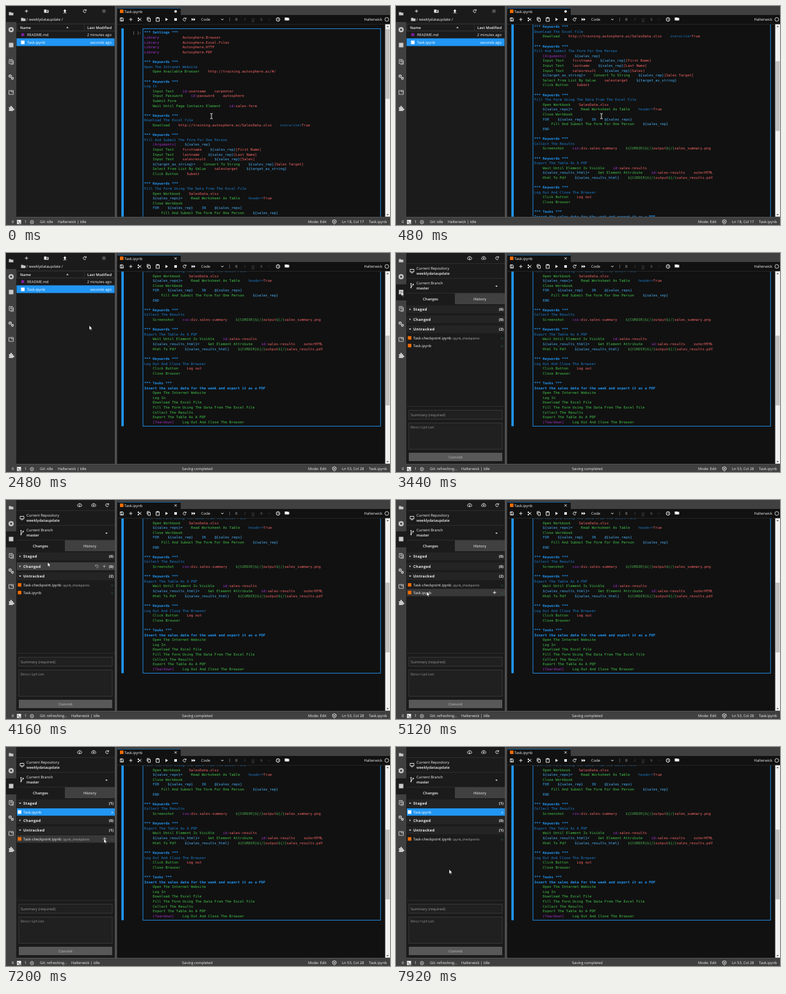
Animation of 600x342 px, one loop 8 s. Source, as an HTML page:

```html
<!DOCTYPE html>
<html lang="en">
<head>
<meta charset="utf-8">
<title>Notebook</title>
<style>
html, body { margin: 0; width: 100%; height: 100%; overflow: hidden; background: #111; }
svg { display: block; }
text { font: 500 5.8px "Open Sans", "Noto Sans", sans-serif; white-space: pre; text-rendering: geometricPrecision; }
.code { font: 5.53px "DejaVu Sans Mono", monospace; }
.semi { font-weight: 600; }
.bold { font-weight: 700; }
</style>
</head>
<body>
<svg id="stage" width="600" height="342" viewBox="0 0 600 342"></svg>
<script>
const BLUE = '#2196f3', SOFT = '#f2f2f2', DIM = '#666', ORANGE = '#ef6c00';
const BAR = '#404040', PANEL = '#1b1b1b', GAP = '#505050', RULE = '#3a3a3a';
const LOOP = 8000, STEP = 80;
const CLICK = 1200, SAVED = 1920, GIT = 3440, SELECT = 5200, STAGE = 7200;

const source = `*** Settings ***
Library           Autosphere.Browser
Library           Autosphere.Excel.Files
Library           Autosphere.HTTP
Library           Autosphere.PDF

*** Keywords ***
Open The Intranet Website
    Open Available Browser    http://training.autosphere.ai/#/

*** Keywords ***
Log In
    Input Text    id:username    carpenter
    Input Password    id:password    autosphere
    Submit Form
    Wait Until Page Contains Element    id:sales-form

*** Keywords ***
Download The Excel file
    Download    http://training.autosphere.ai/SalesData.xlsx    overwrite=True

*** Keywords ***
Fill And Submit The Form For One Person
    [Arguments]    \${sales_rep}
    Input Text    firstname    \${sales_rep}[First Name]
    Input Text    lastname    \${sales_rep}[Last Name]
    Input Text    salesresult    \${sales_rep}[Sales]
    \${target_as_string}=    Convert To String    \${sales_rep}[Sales Target]
    Select From List By Value    salestarget    \${target_as_string}
    Click Button    Submit

*** Keywords ***
Fill The Form Using The Data From The Excel File
    Open Workbook    SalesData.xlsx
    \${sales_reps}=    Read Worksheet As Table    header=True
    Close Workbook
    FOR    \${sales_rep}    IN    @{sales_reps}
        Fill And Submit The Form For One Person    \${sales_rep}
    END

*** Keywords ***
Collect The Results
    Screenshot    css:div.sales-summary    \${CURDIR}\${/}output\${/}sales_summary.png

*** Keywords ***
Export The Table As A PDF
    Wait Until Element Is Visible    id:sales-results
    \${sales_results_html}=    Get Element Attribute    id:sales-results    outerHTML
    Html To Pdf    \${sales_results_html}    \${CURDIR}\${/}output\${/}sales_results.pdf

*** Keywords ***
Log Out And Close The Browser
    Click Button    Log out
    Close Browser

*** Tasks ***
Insert the sales data for the week and export it as a PDF
    Open The Internet Website
    Log In
    Download The Excel File
    Fill The Form Using The Data From The Excel File
    Collect The Results
    Export The Table As A PDF
    [Teardown]    Log Out And Close The Browser`;

// Drawing helpers; text is placed by its vertical centre
const rect = (x, y, w, h, fill, extra = '') => `<rect x="${x}" y="${y}" width="${w}" height="${h}" fill="${fill}" ${extra}/>`;
const frame = (x, y, w, h, color, fill = 'none') => rect(x, y, w, h, fill, `stroke="${color}" stroke-width=".9"`);
const dot = (x, y, r, fill, extra = '') => `<circle cx="${x}" cy="${y}" r="${r}" fill="${fill}" ${extra}/>`;
const text = (x, y, s, color = SOFT, extra = '') => `<text x="${x}" y="${y + 2}" fill="${color}" ${extra}>${s}</text>`;
const line = (x, y, d, color = SOFT) => `<path transform="translate(${x} ${y})" d="${d}" fill="none" stroke="${color}" stroke-width=".9"/>`;
const solid = (x, y, d, color = SOFT) => `<path transform="translate(${x} ${y})" d="${d}" fill="${color}"/>`;
const SEMI = ' class="semi"', BOLD = ' class="bold"', MID = ' text-anchor="middle"', END = ' text-anchor="end"';
const PLUS = 'M-2.5 0H2.5M0-2.5V2.5', FOLDER = 'M-3.5-2.5H-.5L.5-1.5H3.5V2.5H-3.5Z';
const REFRESH = 'M2 1.2A2.3 2.3 0 1 1 1.7-1.6M2.4-2.8V-.8H.4', DOWN = 'M-1.8-.9H1.8L0 1.1Z';
const CLOUD = 'M-1.5 2H-2.5A1.6 1.6 0 0 1-2.3-1A2.5 2.5 0 0 1 2.3-1A1.6 1.6 0 0 1 2.5 2H1.5';

const span = (s, color, bold) => `<tspan fill="${color}"${bold ? BOLD : ''}>${s}</tspan>`;

function paintArg(cell) {
  return cell.replace(/([$@]\{.*?\})|((?:id|css):)|(\w+=)|([^$@]+)/g, (s, variable, locator, option) =>
    span(s, variable ? (/CURDIR|\//.test(s) ? '#4caf50' : '#4aaef0') : locator ? '#a536d0' : option ? '#1b6fb5' : '#f26464'));
}

function paintLine(s) {
  if (/^(\*|Insert)/.test(s)) return span(s, BLUE, true);
  if (s.startsWith('Library')) return span('Library', '#a536d0') + span(s.slice(7), '#f26464');
  if (s[0] !== ' ') return span(s, '#1d7fd0');
  let call = true;
  return s.split(/( {4,})/).map(cell => {
    if (!cell.trim()) return cell;
    if (cell[0] === '[') return span(cell, '#9a2fc0');
    if (/=$/.test(cell)) return span(cell, '#4aaef0');
    if (/^(FOR|IN|END)$/.test(cell)) { call = false; return span(cell, '#36a3ee'); }
    if (call && cell[0] !== '$') { call = false; return span(cell, '#43c34a'); }
    return paintArg(cell);
  }).join('');
}

function notebook() {
  const rows = source.split('\n').map((s, i) =>
    s && `<text class="code" x="216" y="${(43.4 + i * 7.61).toFixed(2)}">${paintLine(s)}</text>`).join('');
  return `<clipPath id="view"><rect x="174" y="29" width="418" height="300"/></clipPath>
    <g clip-path="url(#view)"><g id="cell">` +
    rect(180.3, 35, 3.7, 492.5, BLUE) + frame(214, 35.4, 371.2, 492, BLUE) +
    text(198, 41.5, '[ ]:', '#aaa', 'class="code"') + rows + '</g></g>';
}

function toolbar() {
  const style = (x, s, extra) => text(x, 21, s, DIM, MID + extra);
  return line(181, 21, 'M-2.5-2.5H1.5L2.5-1.5V2.5H-2.5ZM-1.5-1.3H1') + dot(181, 22, 1, SOFT) +
    line(195, 21, PLUS) + line(209, 21, 'M-2.5-2L2.5 2M-2.5 2L2.5-2') +
    dot(206.8, 19.2, 1.1, SOFT) + dot(206.8, 22.8, 1.1, SOFT) +
    line(223, 21, 'M-1-1.5H2.5V3H-1ZM-2.5 1.5V-3H1.5') +
    line(237, 21, 'M-2.5-2.5H2.5V3H-2.5Z') + rect(235.5, 17.5, 3, 2, SOFT) +
    solid(251, 21, 'M-1.8-2.5L2.2 0L-1.8 2.5Z') + rect(263, 19, 4, 4, SOFT) +
    line(279, 21, REFRESH) + solid(293, 21, 'M-3-2.2L0 0L-3 2.2ZM0-2.2L3 0L0 2.2Z') +
    text(305, 21, 'Code') + line(338, 21, 'M-1.8-1L0 1L1.8-1') + rect(349, 18, .7, 6, DIM) +
    style(360, 'B', BOLD) + style(373, 'I', ' style="font-style:italic"') +
    style(386, 'U', ' text-decoration="underline"') + style(399, 'S', ' text-decoration="line-through"') +
    style(411, '···', '') +
    dot(425, 21, 2.8, 'none', `stroke="${SOFT}"`) + line(425, 21, 'M0-1.5V0L1.2 1') +
    solid(438, 20.5, 'M-2.5-2.5H2V2H-2.5Z') + solid(440.5, 21, 'M-1.5-2.5H2V1.5H-1.5Z') +
    text(588, 21, 'Halterwick', SOFT, END) + dot(595, 21, 3, 'none', `stroke="${SOFT}" stroke-width=".8"`);
}

function chrome() {
  const grey = '#cacaca';
  return rect(0, 0, 600, 342, '#111') + rect(0, 0, 16, 332, BAR) + '<g id="active"></g>' +
    solid(8, 12, FOLDER, grey) + dot(8, 37, 4, grey) + rect(6.5, 35.5, 3, 3, BAR) +
    rect(4.5, 57.5, 7, 7, grey) +
    line(8, 87, 'M-3-3.5H2V3H-3ZM-1.5-1.5H1M-1.5 0H1M3.5-2V4H-1', grey) +
    dot(6.5, 109.5, 1.8, 'none', `stroke="${grey}" stroke-width="1.4"`) +
    dot(10, 113, 1.5, 'none', `stroke="${grey}" stroke-width="1.3"`) +
    line(8, 135, 'M-3.5-3H3.5V3H-3.5ZM0-3V-1H3.5', grey) +
    solid(8, 160, 'M-3.5-2H-1.2A1.4 1.4 0 1 1 1.2-2H3V.2A1.4 1.4 0 1 1 3 2.7V4H-3.5V1.8A1.3 1.3 0 0 0-3.5-.4Z', grey) +
    rect(16, 0, 154, 329.5, PANEL) + rect(170, 0, 3.5, 331, GAP) + rect(173.5, 0, 426.5, 14, BAR) +
    rect(174, 3, 99, 11, '#111') + rect(174, 3, 99, .8, '#1b6fb5') +
    rect(178, 5.5, 5.5, 5.5, ORANGE) + text(185, 8.5, 'Task.ipynb') + toolbar() +
    rect(174, 28, 426, .6, '#333') + notebook() +
    rect(592.5, 28.5, 7.5, 300.5, '#f1f1f1') + solid(596.3, 32, 'M-1.8 1L0-1L1.8 1Z', '#505050') +
    solid(596.3, 326, DOWN, '#505050') + rect(593, 36, 6.5, 109, '#c1c1c1', 'id="thumb"') +
    rect(16, 329.3, 584, 2.2, GAP);
}

function files() {
  return line(32, 8, PLUS) + solid(63, 8, FOLDER) + line(64, 8.3, 'M-1.4 0H1.4M0-1.4V1.4', '#111') +
    solid(92, 8, 'M0-3L2.6 0H1V2H-1V0H-2.6ZM-2.6 2.5H2.6V3.3H-2.6Z') +
    line(123, 8, REFRESH) + rect(150.5, 5.5, 5, 5, '#555') +
    solid(27, 21, FOLDER, '#cacaca') + text(32, 21, '/ weeklydataupdate /') +
    frame(17, 28, 153, 11, RULE) + text(22, 33.5, 'Name', SOFT, SEMI) +
    solid(96, 33.5, 'M-2 1L0-1.2L2 1Z', '#ccc') + rect(122, 28, .7, 11, RULE) +
    text(165, 33.5, 'Last Modified', SOFT, SEMI + END) +
    rect(24, 42.5, 4.5, 4.5, '#7b1fa2') + text(33, 45, 'README.md') + text(165, 45, '2 minutes ago', SOFT, END) +
    rect(16.5, 50.5, 153, 12, BLUE) + rect(23.5, 54, 5.5, 5.5, '#fff') + text(33, 57, 'Task.ipynb', '#fff') +
    text(165, 57, 'seconds ago', '#fff', END);
}

function changes(t, mouse) {
  const staged = t >= STAGE;
  const over = (y, h) => mouse.x > 17 && mouse.x < 170 && Math.abs(mouse.y - y) < h;
  const task = { name: 'Task.ipynb', dir: '', picked: t >= SELECT, mark: staged ? 'A' : 'U' };
  const check = { name: 'Task-checkpoint.ipynb', dir: '.ipynb_checkpoints', mark: 'U' };
  const sections = [['Staged', staged ? [task] : []], ['Changed', []], ['Untracked', staged ? [check] : [check, task]]];
  let y = 88, out = '';
  for (const [title, list] of sections) {
    const hover = over(y, 6.8);
    out += rect(17, y - 6.2, 153, 12.4, hover ? BAR : '#242424') +
      solid(22, y, list.length ? DOWN : 'M-.8-1.6L1.1 0L-.8 1.6Z') +
      text(27, y, title, SOFT, BOLD + ' letter-spacing=".35"') + text(168, y, `(${list.length})`, SOFT, BOLD + END);
    if (hover && title === 'Changed')
      out += line(142, y, 'M-2.3-2.3V-.3H-.3M-2.2-.4A2.3 2.3 0 1 1-1 2.2', '#999') + line(153.5, y, PLUS, '#999');
    y += list.length ? 13.5 : 15.5;
    list.forEach((file, i) => {
      const hot = over(y, 5.8), color = file.picked ? '#fff' : SOFT;
      if (file.picked || hot) out += rect(17, y - 5.8, 153, 11.6, file.picked ? BLUE : '#383838');
      out += rect(18.5, y - 2.7, 5.5, 5.5, file.picked ? '#fff' : ORANGE) + text(27, y, file.name, color) +
        text(88, y, file.dir, '#bbb', 'style="font-size:4.8px"') +
        text(166, y, file.mark, file.picked ? '#fff' : '#2e7d4a', MID + ' style="font-size:4.6px"');
      if (hot) out += line(154, y, PLUS, color);
      y += i < list.length - 1 ? 12 : 13;
    });
  }
  return out;
}

function gitPanel(t, mouse) {
  return line(115, 8, CLOUD + 'M0-1V3M-1.3 1.7L0 3L1.3 1.7') + line(137, 8, CLOUD + 'M0 3V-.5M-1.3 .8L0-.5L1.3 .8') +
    line(158, 8, REFRESH) + rect(17, 16, 153, .6, RULE) +
    line(25, 28, 'M-3-2.5H3V1.5H-3ZM-1.5 3H1.5') + text(32, 24, 'Current Repository') +
    text(32, 32, 'weeklydataupdate', SOFT, SEMI) + rect(17, 39.5, 153, .6, RULE) +
    line(25, 51, 'M-1.5-2V2M1.8-1.5C1.8 .8-1.5 0-1.5 2') +
    [[23.5, 48], [23.5, 54], [26.8, 49]].map(([x, y]) => dot(x, y, 1, SOFT)).join('') +
    text(32, 47, 'Current Branch') + text(32, 55, 'master', SOFT, SEMI) + solid(157, 52, DOWN) +
    rect(17, 62.5, 153, .6, RULE) + rect(92, 63, 78, 17, BAR) +
    text(54, 71.8, 'Changes', SOFT, MID + SEMI) + text(131, 71.8, 'History', '#ccc', MID + SEMI) +
    changes(t, mouse) + rect(17, 239, 153, .6, RULE) +
    frame(20, 245.5, 146, 14, RULE, '#202020') + text(23, 252.5, 'Summary (required)', '#999') +
    frame(20, 265.5, 146, 41, RULE, '#202020') + text(23, 272, 'Description', '#888', 'class="code"') +
    rect(20, 312, 146, 13, '#585858') + text(93, 318.8, 'Commit', '#a5a5a5', MID + SEMI);
}

function statusBar(t) {
  return rect(0, 331.5, 600, 10.5, BAR) + text(9, 337, '0') + rect(17, 334, 6.5, 6.5, SOFT) +
    line(20, 337, 'M-2-1.5L-.5 0L-2 1.5M0 2H2.5', '#222') + text(29, 337, '1') +
    dot(40.5, 337.5, 2.6, 'none', 'stroke="#ccc"') + dot(40.5, 337.5, .9, '#ccc') +
    text(53, 337, t < GIT ? 'Git: idle' : 'Git: refreshing...') +
    text(t < GIT ? 81 : 102, 337, 'Halterwick | Idle') +
    (t < SAVED ? '' : text(299, 337, 'Saving completed', SOFT, MID)) +
    text(472, 337, 'Mode: Edit') + line(513, 337, 'M0-3.2L2.8-2V0C2.8 1.8 1 3 0 3.4C-1 3-2.8 1.8-2.8 0V-2ZM-1.2-.9L1.2 1.3M1.2-.9L-1.2 1.3') +
    text(525, 337, t < CLICK ? 'Ln 18, Col 17' : 'Ln 53, Col 28') + text(567, 337, 'Task.ipynb');
}

const path = [
  [0, 321, 172], [1000, 321, 172], [1200, 322, 180], [1840, 322, 178], [2400, 130, 113], [2720, 130, 113],
  [3280, 8, 60], [3520, 8, 60], [4160, 65, 97], [4400, 65, 97], [5040, 48, 143], [5440, 48, 143],
  [6000, 107, 177], [6560, 107, 177], [7000, 153, 143], [7280, 153, 143], [7680, 83, 191], [LOOP, 83, 191]];

function mouseAt(t) {
  const i = path.findIndex(p => p[0] > t), [t0, x0, y0] = path[i - 1], [t1, x1, y1] = path[i];
  const k = (t - t0) / (t1 - t0), e = k * k * (3 - 2 * k);
  return { x: x0 + (x1 - x0) * e, y: y0 + (y1 - y0) * e };
}

function pointer({ x, y }) {
  return x > 214
    ? line(x, y, 'M-2-4H-.5L0-3.5L.5-4H2M0-3.5V3.5M-2 4H-.5L0 3.5L.5 4H2', '#fff')
    : `<path transform="translate(${x} ${y})" d="M0 0V7.2L1.7 5.7L2.9 8.2L4 7.7L2.9 5.3H5Z" fill="#fff" stroke="#000" stroke-width=".5"/>`;
}

const stage = document.getElementById('stage');
stage.innerHTML = chrome() + ['close', 'panel', 'status', 'pointer'].map(id => `<g id="${id}"></g>`).join('');
const put = (id, html) => { document.getElementById(id).innerHTML = html; };

function draw(t) {
  const mouse = mouseAt(t), git = t >= GIT;
  const scroll = 257 * Math.min(1, Math.max(0, (t - 105) / 695));
  document.getElementById('cell').setAttribute('transform', `translate(0 ${-scroll})`);
  document.getElementById('thumb').setAttribute('y', 36 + scroll * .362);
  put('active', rect(0, git ? 49 : 0, 16, 25, PANEL));
  put('close', t < SAVED ? dot(265, 8.5, 2, SOFT) : line(265, 8.5, 'M-1.8-1.8L1.8 1.8M-1.8 1.8L1.8-1.8'));
  put('panel', git ? gitPanel(t, mouse) : files());
  put('status', statusBar(t));
  put('pointer', pointer(mouse));
}

let last = -1;
function tick() {
  const t = Math.floor(performance.now() % LOOP / STEP) * STEP;
  if (t !== last) draw(last = t);
  requestAnimationFrame(tick);
}
tick();
</script>
</body>
</html>
```
